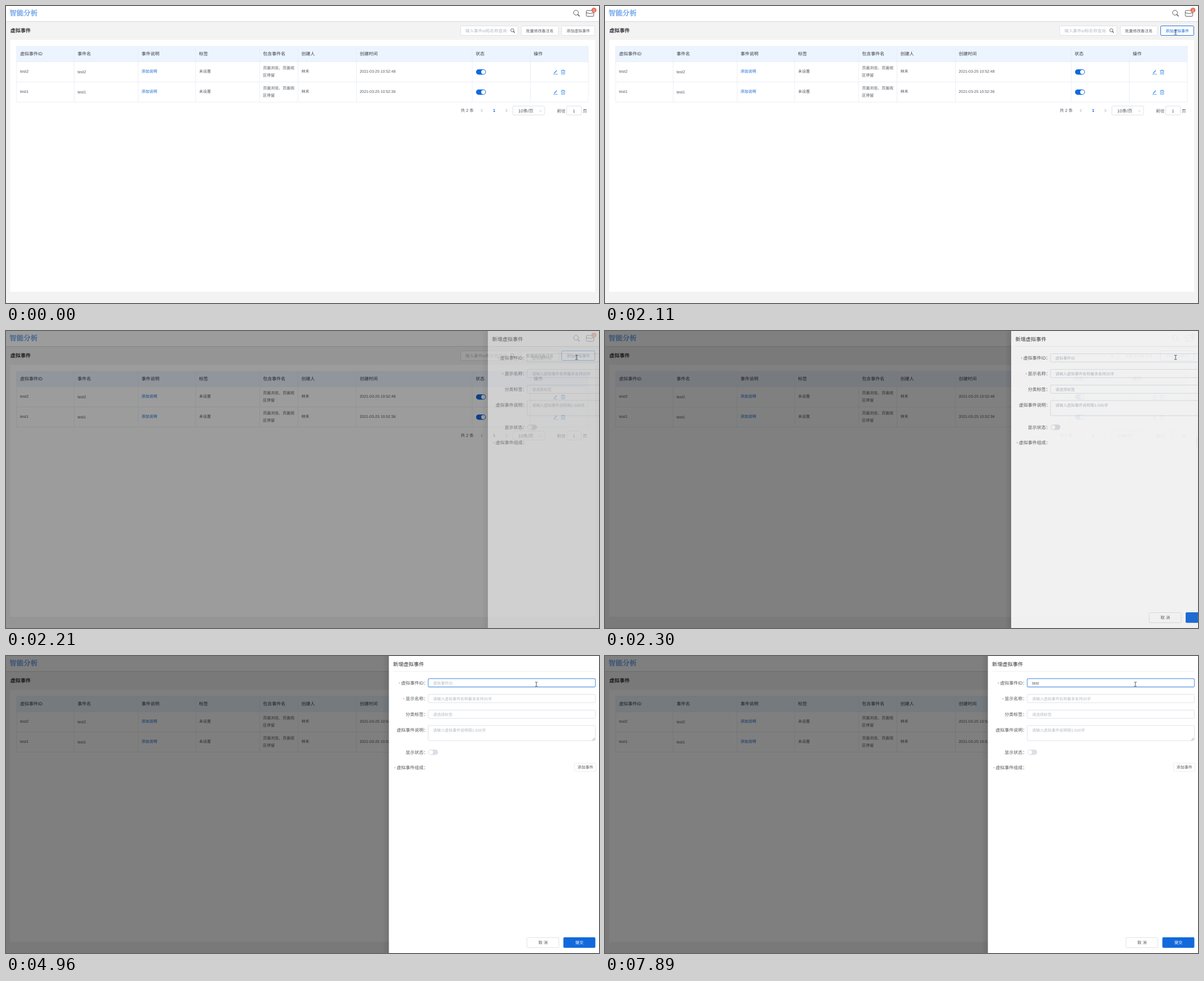
These frames come from a looping animation (1057x530 px, 8 s). An HTML page:

```html
<!DOCTYPE html>
<html>
<head>
<meta charset="utf-8">
<title>虚拟事件</title>
<style>
  html, body { margin: 0; width: 100%; height: 100%; overflow: hidden; background: #f3f3f3; }
  svg { display: block; width: 1057px; height: 530px; }
  text { font-family: "Liberation Sans", "Noto Sans CJK SC", "Noto Sans CJK", sans-serif; white-space: pre; text-rendering: geometricPrecision; }
  .logo { font-family: "Noto Serif CJK SC", "Noto Sans CJK SC", "Noto Sans CJK", serif; stroke: #78aaea; stroke-width: .3; }
</style>
</head>
<body>
<svg id="stage" viewBox="0 0 1057 530"></svg>
<script>
const BLUE = '#1269db', LINE = '#dcdfe6', GRID = '#e9edf4', INK = '#3c3e42', CELL = '#55575c', HINT = '#b4b8c0';

const text = (x, y, s, size = 7, fill = CELL, extra = '') =>
  `<text x="${x}" y="${y}" font-size="${size}" fill="${fill}" ${extra}>${s}</text>`;
const rect = (x, y, w, h, fill, extra = '') =>
  `<rect x="${x}" y="${y}" width="${w}" height="${h}" fill="${fill}" ${extra}/>`;
const box = (x, y, w, h, stroke = LINE, extra = '') =>
  rect(x, y, w, h, '#fff', `rx="1.8" stroke="${stroke}" stroke-width=".9" ${extra}`);
const path = (d, stroke, width = 1, extra = '') =>
  `<path d="${d}" fill="none" stroke="${stroke}" stroke-width="${width}" ${extra}/>`;
const toggle = (x, y, on) => rect(x, y - 4.7, 17.6, 9.4, on ? BLUE : LINE, 'rx="4.7"') +
  `<circle cx="${x + (on ? 12.9 : 4.7)}" cy="${y}" r="3.7" fill="#fff"/>`;
const lens = (x, y, r, color, width) =>
  `<circle cx="${x}" cy="${y}" r="${r}" fill="none" stroke="${color}" stroke-width="${width}"/>` +
  path(`M${x + r * .7} ${y + r * .7}l${r * .8} ${r * .8}`, color, width * 1.6);
const middle = 'text-anchor="middle"', bold = 'font-weight="bold"';

const columns = [19, 121.5, 235.5, 338, 452, 520.5, 624.5, 831, 934.5, 1038];
const heads = ['虚拟事件ID', '事件名', '事件说明', '标签', '包含事件名', '创建人', '创建时间', '状态', '操作'];

function row(y, name, time) {
  const c = columns.map(x => x + 6);
  return text(c[0], y + 2, name) + text(c[1], y + 2.6, name) +
    text(c[2], y + 2.2, '添加说明', 7, '#1a6ad6') + text(c[3] + .3, y + 2.2, '未设置') +
    text(c[4], y - 4, '页面浏览、页面视') + text(c[4], y + 9, '区停留') +
    text(c[5], y + 2.2, '林禾') + text(c[6], y + 2, time, 6.9) +
    toggle(837.8, y + .7, true) +
    path(`M977 ${y + 3}l4.8-5`, '#3b8ee8', 1.4) + path(`M975.5 ${y + 4.6}h8`, '#3b8ee8', .8) +
    path(`M989.2 ${y - 1.6}h7.6M991.6 ${y - 1.6}v-1.2h2.8v1.2M990.2 ${y - 1.6}v6.2h5.6v-6.2M992.2 ${y + .4}v2.6M993.8 ${y + .4}v2.6`, '#3b8ee8', .8);
}

function page() {
  return rect(0, 0, 1057, 530, '#f3f3f3') +
    rect(0, 0, 1057, 27, '#fff') + rect(0, 27, 1057, 1, '#dedede') + rect(0, 28, 1057, 1, '#ececec') +
    text(6.3, 17.3, '智能分析', 12.5, '#78aaea', `class="logo" ${bold}`) +
    lens(1016, 12, 4.3, '#5c5c5c', 1) +
    path('M1036 8h10q1.7 0 1.7 1.7v7q0 1.7-1.7 1.7h-10q-1.7 0-1.7-1.7v-7q0-1.7 1.7-1.7zM1034.5 12q6.5 3 13 0', '#5c5c5c', 1) +
    '<circle cx="1048" cy="7.4" r="4.5" fill="#e9705c"/>' + text(1048, 9.7, '1', 6.5, '#fff', middle) +
    text(7.7, 46.8, '虚拟事件', 9.1, '#303133', bold) +
    box(810.5, 35.5, 102, 17) + text(819, 46.8, '输入事件id和名称查询', 7.55, HINT) + lens(902.5, 43.3, 2.8, '#555', .9) +
    box(918.5, 35.5, 66, 17) + text(927, 46.7, '批量修改备注名') +
    box(990.5, 35.5, 59, 17) + text(999, 46.7, '添加虚拟事件') +
    `<g id="hot">${box(990.5, 35.5, 59, 17, BLUE)}${text(999, 46.7, '添加虚拟事件', 7, BLUE)}</g>` +
    rect(7.5, 60.5, 1042.5, 449.5, '#fff') + rect(19, 72, 1019, 27.5, '#ecf5ff') +
    path('M19 72H1038M19 99.5H1038M19 135.5H1038M19 171.5H1038' + columns.map(x => `M${x} 72V171.5`).join(''), GRID, .9) +
    heads.map((s, i) => text(columns[i] + 6, 88.4, s, 8, INK)).join('') +
    row(117, 'test2', '2021-03-25 10:52:48') + row(153, 'test1', '2021-03-25 10:52:36') +
    text(810.5, 188.8, '共 2 条', 7.5) + path('M849.3 184l-2.5 2.5 2.5 2.5M890.7 184l2.5 2.5-2.5 2.5', '#888', .8) +
    text(870, 189, '1', 7.5, BLUE, `${middle} ${bold}`) +
    box(903.5, 178.5, 56.5, 16) + text(913, 189.7, '10条/页', 8) + path('M950.4 186.2l2.2 2.2 2.2-2.2', '#bbb', .8) +
    text(982, 189.8, '前往', 7.7) + box(999.5, 178.5, 26, 16) + text(1012.4, 189.6, '1', 7.5, CELL, middle) +
    text(1028, 189.8, '页', 7.7);
}

function field(y, label, star, h, hint) {
  const width = [...label].reduce((w, c) => w + (c === 'I' ? .278 : c === 'D' ? .722 : 1), 0) * 8;
  return (star ? text(752.3 - width - 4.6, y + 4, '*', 7.5, '#f5826c') : '') +
    text(752.3, y + 3, label, 8, CELL, 'text-anchor="end"') +
    (h ? box(752.5, y - 7.5, 298, h) : '') +
    (hint ? text(761.3, y + 2.7 + (h > 20 ? 1.2 : 0), hint, 6.95, HINT, y === 48 ? 'id="hint"' : '') : '');
}

function drawer() {
  return rect(670.5, 0, 12, 530, 'url(#shade)') + rect(682.5, 0, 375, 530, '#fff') +
    text(690, 18.2, '新增虚拟事件', 9.2, '#303133', 'font-weight="500"') + rect(690, 27, 360, .8, '#ebeef5') +
    field(48, '虚拟事件ID：', true, 14.8, '虚拟事件ID') +
    box(752.5, 40.5, 298, 14.8, '#b4b8c0', 'id="over" style="fill:none"') +
    box(752.5, 40.5, 298, 14.8, '#3b8cf0', 'id="focus" style="fill:none"') +
    text(761.3, 50.6, '', 7.5, CELL, 'id="typed"') + rect(761.2, 43, .8, 10, '#333', 'id="caret"') +
    field(76, '显示名称：', true, 14.8, '请输入虚拟事件名称最多支持20字') +
    field(104, '分类标签：', false, 14.8, '请选择标签') +
    field(131.5, '虚拟事件说明：', false, 27, '请输入虚拟事件说明限1-500字') +
    path('M1045 150.5l4.5-4.5M1047.5 150.5l2-2', '#777', .7) +
    field(171.5, '显示状态：', false) + toggle(752.7, 171.7, false) +
    field(198.5, '虚拟事件组成：', true) +
    box(1013.3, 191.3, 38.5, 14.8, '#e8eaef') + text(1018.7, 201.2, '添加事件') +
    box(928.5, 502.5, 57, 18) + text(957.2, 514.2, '取 消', 7.3, CELL, middle) +
    rect(993.5, 502, 57, 18.7, BLUE, 'rx="1.8"') + text(1022, 514.2, '提交', 7.3, '#fff', middle);
}

document.getElementById('stage').innerHTML =
  `<defs><linearGradient id="shade"><stop stop-opacity="0"/><stop offset="1" stop-opacity=".1"/></linearGradient></defs>
  ${page()}${rect(0, 0, 1057, 530, '#000', 'id="mask"')}<g id="drawer">${drawer()}</g>
  <g id="cursor"><path id="arrow" d="M0 0v9l2.1-1.9 1.4 3.2 1.3-.6-1.4-3.1h2.9z" fill="#fff" stroke="#222" stroke-width=".7"/>
  ${path('M-2.3-3.6H-.5L0-3.2.5-3.6H2.3M-2.3 3.8H-.5L0 3.4.5 3.8H2.3M0-3.2V3.4', '#333', .8, 'id="beam"')}</g>`;

const $ = id => document.getElementById(id);
const show = (id, opacity) => $(id).setAttribute('opacity', opacity);
const move = (id, x, y) => $(id).setAttribute('transform', `translate(${x} ${y})`);
const clamp = v => Math.min(1, Math.max(0, v));
const ramp = (t, a, b) => clamp((t - a) / (b - a));
const smooth = u => u * u * (3 - 2 * u);

// CSS "ease": cubic-bezier(.25, .1, .25, 1)
function ease(x) {
  let lo = 0, hi = 1, s;
  for (let i = 0; i < 20; i++) {
    s = (lo + hi) / 2;
    const bx = .75 * s * (1 - s) + s ** 3;
    if (bx < x) lo = s; else hi = s;
  }
  return .3 * s * (1 - s) ** 2 + 3 * s * s * (1 - s) + s ** 3;
}

// Time, x, y
const trail = [[400, 1050, 532], [1210, 1024, 82], [1250, 1023, 78], [1520, 1017, 47], [2810, 1017, 47],
  [2960, 967.5, 54], [3200, 945.3, 50.3], [8000, 945.3, 50.3]];
function pointer(t) {
  const i = Math.max(1, trail.findIndex(p => p[0] > t));
  const [a, x, y] = trail[i - 1], [b, x2, y2] = trail[i];
  const k = smooth(ramp(t, a, b));
  return [x + (x2 - x) * k, y + (y2 - y) * k];
}

const keys = [5760, 5940, 6080, 6360], advance = [0, 2.1, 6.3, 10, 12.1];
const blinks = [[3400, 3930], [4440, 4960], [5460, 6870], [7370, 7890]];

function draw(t) {
  show('hot', ramp(t, 1440, 1520));
  const open = .097 * ramp(t, 2150, 2180) + .208 * ramp(t, 2180, 2210) + .695 * ramp(t, 2210, 2420);
  const slide = open ? ease(open) : 0;
  show('mask', open ? .5 * ease(clamp(open * 1.54)) : 0);
  show('drawer', slide);
  move('drawer', 375 * (1 - slide), 0);

  show('over', ramp(t, 2300, 2420));
  show('focus', ease(ramp(t, 3380, 3600)));
  const count = keys.filter(k => t >= k).length;
  show('hint', count ? 0 : 1);
  $('typed').textContent = 'test'.slice(0, count);
  show('caret', blinks.some(([a, b]) => t >= a && t < b) ? 1 : 0);
  move('caret', advance[count], 0);

  show('cursor', t >= 410 ? 1 : 0);
  show('arrow', t < 1480 ? 1 : 0);
  show('beam', t < 1480 ? 0 : 1);
  move('cursor', ...pointer(t));
}

const start = performance.now();
function tick() {
  draw((performance.now() - start) % 8000);
  requestAnimationFrame(tick);
}
tick();
</script>
</body>
</html>
```
